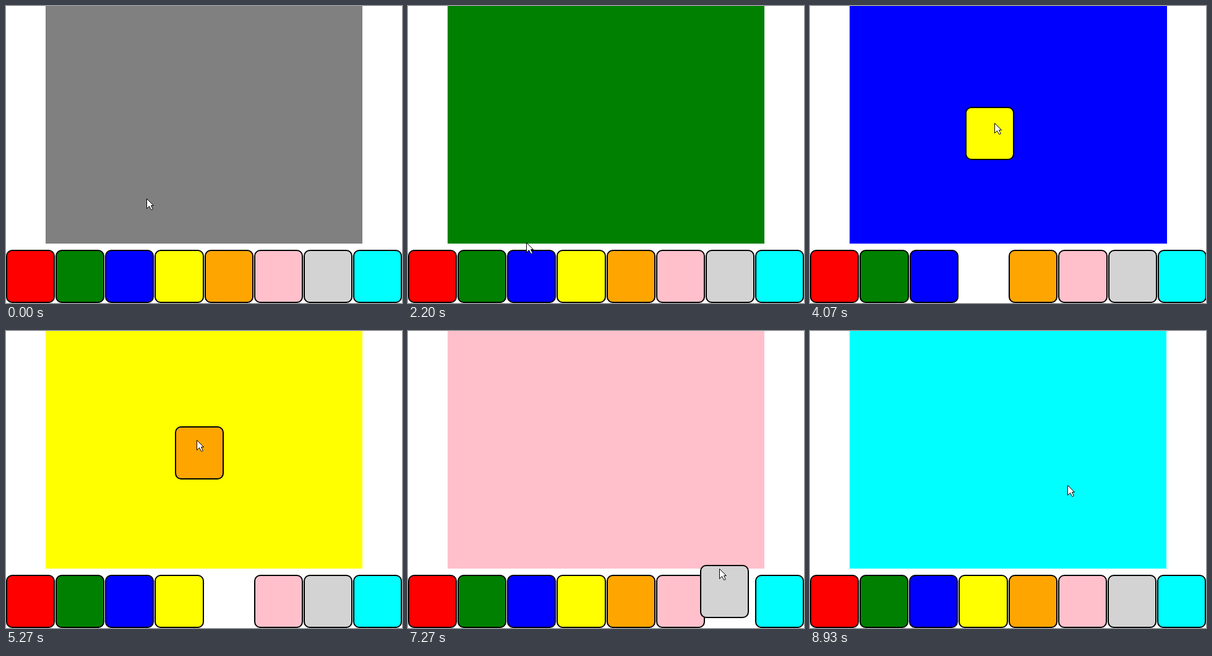
Recreate the animation shown at these times as an HTML page with a canvas. Size 640 by 480 pixels, loop 9.74 s.

```html
<!DOCTYPE html>
<html lang="en">
<head>
<meta charset="utf-8">
<title>Drag a colour</title>
<style>
  html, body { margin: 0; width: 100%; height: 100%; overflow: hidden; background: #fff; }
  canvas { display: block; width: 640px; height: 480px; }
</style>
</head>
<body>
<canvas id="stage" width="640" height="480"></canvas>
<script>
const ctx = document.getElementById('stage').getContext('2d');
const LOOP = 9740;
const TICK = 200 / 3;   // the picture steps 15 times a second
const TRAVEL = 8;       // ticks from leaving a dropped tile to grabbing the next
const HOLD = 2;         // ticks a tile rests before it is dropped
const SLOP = 30;        // pixels the pointer moves before the tile follows
const TILE_TOP = 394;
const START = { x: 227, y: 311 };

// Every tile is grabbed at one point and dropped at another
const drag = (color, grab, drop, x, y, toX, toY) =>
  ({ color, grab, drop, from: { x, y }, to: { x: toX, y: toY } });
const DRAGS = [
  drag('red', 7, 14, 36, 432, 158, 284),
  drag('green', 21, 28, 96, 451, 181, 199),
  drag('blue', 36, 45, 194, 440, 238, 166),
  drag('yellow', 54, 63, 287, 450, 298, 189),
  drag('orange', 73, 81, 362, 445, 308, 176),
  drag('pink', 92, 98, 455, 431, 373, 206),
  drag('lightgray', 108, 115, 525, 427, 417, 212),
  drag('cyan', 124, 134, 610, 426, 416, 249)
];

const clamp = u => Math.min(1, Math.max(0, u));
const ease = u => (u + u * u * (3 - 2 * u)) / 2;
const between = (a, b, u) => ({
  x: Math.round(a.x + (b.x - a.x) * u),
  y: Math.round(a.y + (b.y - a.y) * u)
});

function pointerAt(tick) {
  const next = DRAGS.findIndex(d => tick < d.drop);
  if (next < 0) return DRAGS.at(-1).to;
  const { grab, drop, from, to } = DRAGS[next];
  if (tick > grab) return between(from, to, clamp((tick - grab) / (drop - HOLD - grab)));
  const previous = DRAGS[next - 1] || { drop: 0, to: START };
  const leave = Math.max(previous.drop, grab - TRAVEL);
  return between(previous.to, from, ease(clamp((tick - leave) / (grab - 1 - leave))));
}

// Columns share the stage width with one pixel between them
function slot(i, width) {
  const size = (width - 7) / 8;
  const left = i * (size + 1);
  const x = Math.round(left);
  return { x, width: Math.round(left + size) - x };
}

function drawTile(color, x, y, width) {
  ctx.beginPath();
  ctx.roundRect(x + 1, y + 1, width - 2, 84, 9);
  ctx.fillStyle = color;
  ctx.fill();
  ctx.lineWidth = 2;
  ctx.strokeStyle = '#000';
  ctx.stroke();
}

function drawHeldTile({ color, from, to }, home, pointer) {
  const dx = to.x - from.x, dy = to.y - from.y;
  const lag = SLOP / Math.hypot(dx, dy);
  const offsetX = Math.round(from.x + dx * lag - home.x);
  const offsetY = Math.round(from.y + dy * lag - TILE_TOP);
  drawTile(color, pointer.x - offsetX, pointer.y - offsetY, 79);
}

const arrow = new Path2D('M.5 .5V16.5L4.5 12.5L7.5 18.2H9.5L10.2 17.2L7.5 11.5H11.5Z');

function drawPointer({ x, y }) {
  ctx.save();
  ctx.translate(x, y);
  ctx.fillStyle = '#fff';
  ctx.fill(arrow);
  ctx.lineWidth = 1;
  ctx.strokeStyle = '#000';
  ctx.stroke(arrow);
  ctx.restore();
}

function draw(tick) {
  const dropped = DRAGS.filter(d => tick >= d.drop);
  const held = DRAGS.findIndex(d => tick > d.grab && tick < d.drop);
  const pointer = pointerAt(tick);
  // Each drop toggles the layout between 640 and 641 pixels wide
  const width = 640 + dropped.length % 2;

  ctx.fillStyle = '#fff';
  ctx.fillRect(0, 0, 640, 480);
  ctx.fillStyle = dropped.length ? dropped.at(-1).color : 'gray';
  ctx.fillRect(64, 0, Math.round(width * 0.9) - 64, 384);

  DRAGS.forEach(({ color }, i) => {
    const home = slot(i, width);
    if (i !== held) drawTile(color, home.x, TILE_TOP, home.width);
  });
  if (held >= 0) drawHeldTile(DRAGS[held], slot(held, width), pointer);
  drawPointer(pointer);
}

function frame() {
  const time = performance.now() % LOOP;
  draw(Math.floor((time + 3.4) / TICK));
  requestAnimationFrame(frame);
}
frame();
</script>
</body>
</html>
```
